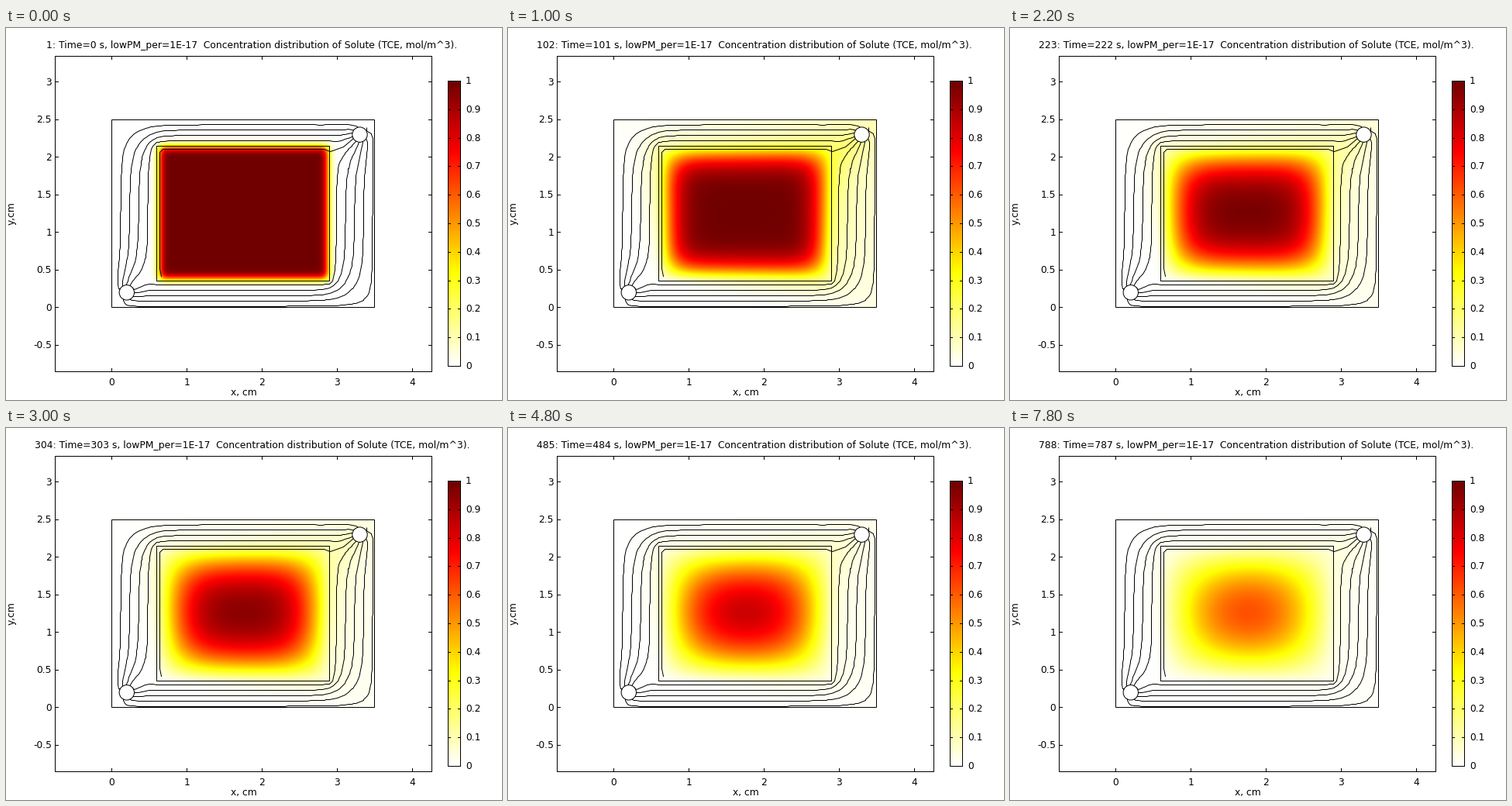
Animation of 640 by 480 pixels, one loop 8 s. Source, as a matplotlib script:

```python
import math

import matplotlib.pyplot as plt
import numpy as np
from matplotlib.animation import FuncAnimation
from matplotlib.colors import LinearSegmentedColormap
from matplotlib.patches import Circle, Rectangle

W, H, DPI = 640, 480, 100
FRAMES, INTERVAL = 40, 200
SEC_PER_FRAME = 20.2
UNIT = 97                      # pixels per cm
PT = 72 / DPI                  # points per pixel

# Domain, low-permeability block and wells, in cm
LX, LY = 3.5, 2.5
BX0, BX1, BY0, BY1 = 0.6, 2.9, 0.35, 2.15
INLET, OUTLET, WELL_R = (0.2, 0.2), (3.3, 2.3), 0.1

# Transport model
CELL = 0.05
D_BLOCK, D_FLOW = 0.00026, 0.001
FLOW = 0.03                    # discharge through each side channel
STEPS = 202
DT = SEC_PER_FRAME / STEPS

erf = np.vectorize(math.erf)


def px(x):
    return 135.9 + UNIT * x


def py(y):
    return 360.2 - UNIT * y


def cell_centres(size):
    x = np.arange(size / 2, LX, size)
    y = np.arange(size / 2, LY, size)
    return np.meshgrid(x, y)


def initial(x, y, w=0.075):
    def band(v, lo, hi):
        return (erf((v - lo) / w) - erf((v - hi) / w)) / 2
    return band(x, 0.64, 2.875) * band(y, 0.375, 2.125)


def well(x, y, centre):
    disc = np.hypot(x - centre[0], y - centre[1]) < WELL_R
    return disc * 2 * FLOW / (disc.sum() * CELL ** 2)


def flow_field(free, source):
    """Face velocities of potential flow around the block."""
    ids = np.full(free.shape, -1)
    count = free.sum()
    ids[free] = np.arange(count)
    a = np.zeros((count, count))
    for left, right in ((ids[:, :-1], ids[:, 1:]), (ids[:-1], ids[1:])):
        is_open = (left >= 0) & (right >= 0)
        i, j = left[is_open], right[is_open]
        a[i, j] -= 1
        a[j, i] -= 1
        np.add.at(a, (i, i), 1)
        np.add.at(a, (j, j), 1)
    a[0, 0] += 1
    p = np.zeros(free.shape)
    p[free] = np.linalg.solve(a, source[free] * CELL ** 2)
    u = (p[:, :-1] - p[:, 1:]) / CELL * (free[:, :-1] & free[:, 1:])
    v = (p[:-1] - p[1:]) / CELL * (free[:-1] & free[1:])
    return u, v


def face_weights(vel, d0, d1):
    """Upwind advection plus diffusion across a face, per time step."""
    diff = 2 * d0 * d1 / (d0 + d1) / CELL
    scale = DT / CELL
    return (np.maximum(vel, 0) + diff) * scale, (np.maximum(-vel, 0) + diff) * scale


def transport(c, u, v, free, sink):
    """Concentration field at every frame."""
    d = np.where(free, D_FLOW, D_BLOCK)
    ax0, ax1 = face_weights(u, d[:, :-1], d[:, 1:])
    ay0, ay1 = face_weights(v, d[:-1], d[1:])
    keep = 1 - sink * DT
    fields = [initial(*cell_centres(0.01))]
    for _ in range(FRAMES - 1):
        for _ in range(STEPS):
            fx = ax0 * c[:, :-1] - ax1 * c[:, 1:]
            fy = ay0 * c[:-1] - ay1 * c[1:]
            c = c * keep
            c[:, :-1] -= fx
            c[:, 1:] += fx
            c[:-1] -= fy
            c[1:] += fy
        fields.append(c.copy())
    return fields


def stream_functions(u):
    """Flux share counted from the top wall and from the bottom wall."""
    share = np.pad(u, ((0, 0), (1, 1))) * CELL / FLOW
    below = np.pad(np.cumsum(share, 0), ((1, 0), (0, 0)))
    above = np.pad(np.cumsum(share[::-1], 0), ((1, 0), (0, 0)))[::-1]
    return above, below


gx, gy = cell_centres(CELL)
free = ~((gx > BX0) & (gx < BX1) & (gy > BY0) & (gy < BY1))
sink = well(gx, gy, OUTLET)
u, v = flow_field(free, well(gx, gy, INLET) - sink)
fields = transport(initial(gx, gy), u, v, free, sink)

plt.rcParams["font.family"] = "DejaVu Sans"
fig = plt.figure(figsize=(W / DPI, H / DPI), dpi=DPI, facecolor="white")
ax = fig.add_axes([0, 0, 1, 1])
ax.axis("off")

heat = LinearSegmentedColormap.from_list("heat", [
    (0, (1, 1, 1)), (0.33, (1, 1, 0)), (0.75, (1, 0, 0)), (1, (0.44, 0, 0))], 512)


def line(xs, ys):
    ax.plot(xs, ys, color="black", lw=PT, snap=True, zorder=3)


def box(x0, y0, x1, y1):
    ax.add_patch(Rectangle((x0, y0), x1 - x0, y1 - y0, fill=False, ec="black",
                           lw=PT, snap=True, zorder=3))


def label(x, y, text, ha="center", va="baseline", size=12.3, **kw):
    return ax.text(x, y, text, fontsize=size * PT, ha=ha, va=va, **kw)


def image(data, extent, interpolation):
    return ax.imshow(data, cmap=heat, vmin=0, vmax=1, origin="lower",
                     extent=extent, interpolation=interpolation,
                     aspect="auto", zorder=1)


def streamlines(psi, side, levels):
    """Contours on one side of the line joining the wells."""
    x = np.arange(psi.shape[1]) * CELL
    y = np.arange(psi.shape[0])[:, None] * CELL
    dx, dy = OUTLET[0] - INLET[0], OUTLET[1] - INLET[1]
    offset = ((y - INLET[1]) * dx - (x - INLET[0]) * dy) / math.hypot(dx, dy)
    shown = np.where(side * offset > -CELL, psi, np.nan)
    ax.contour(px(x), py(y[:, 0]), shown, levels=levels, colors="black",
               linewidths=PT, zorder=3).set_snap(True)


heatmap = image(fields[0], (px(0), px(LX), py(0), py(LY)), "bicubic")

box(px(0), py(0), px(LX), py(LY))
box(px(BX0), py(BY0), px(BX1), py(BY1))

above, below = stream_functions(u)
streamlines(above, 1, np.arange(0.2, 0.9, 0.2))
streamlines(below, -1, np.arange(0.05, 0.9, 0.2))
# The one streamline that runs just inside the block
line([200, 198, 198, 202, 410, 418, 435, 448],
     [320, 310, 160, 156, 156, 159, 153, 142])

for wx, wy in (INLET, OUTLET):
    ax.add_patch(Circle((px(wx) + 0.5, py(wy) + 0.5), WELL_R * UNIT,
                        fc="white", ec="black", lw=PT, zorder=4))

# Plot frame with inward ticks on all sides
X0, X1, Y0, Y1 = 63, 549, 36, 443
TICK = 4
box(X0, Y0, X1, Y1)
for t in range(5):
    x = px(t)
    line([x, x], [Y1, Y1 - TICK])
    line([x, x], [Y0, Y0 + TICK])
    label(x + 0.5, 461, str(t))
for t in np.arange(-0.5, 3.01, 0.5):
    y = py(t)
    line([X0, X0 + TICK], [y, y])
    line([X1, X1 - TICK], [y, y])
    label(59, y + 4.5, f"{t:g}", ha="right")
label(307, 474, "x, cm")
label(7, 239, "y,cm", va="center", rotation=90)

# Colour scale
CX0, CX1, CY0, CY1 = 570, 586, 68, 436
image(np.linspace(0, 1, 370)[:, None], (CX0, CX1, CY1, CY0), "nearest")
box(CX0, CY0, CX1, CY1)
for t in range(11):
    y = CY1 + (CY0 - CY1) * t / 10
    line([CX0, CX0 + 3], [y, y])
    line([CX1, CX1 - 3], [y, y])
    label(593, y + 4, f"{t / 10:g}", ha="left")

title = label(317.5, 26, "", size=12.4)
ax.set_xlim(0, W)
ax.set_ylim(H, 0)


def draw(i):
    sec = int(i * SEC_PER_FRAME)
    title.set_text(f"{sec + 1}: Time={sec} s, lowPM_per=1E-17  Concentration "
                   "distribution of Solute (TCE, mol/m^3).")
    heatmap.set_data(fields[i])
    return heatmap, title


anim = FuncAnimation(fig, draw, frames=FRAMES, interval=INTERVAL, repeat=True)
plt.show()
```
